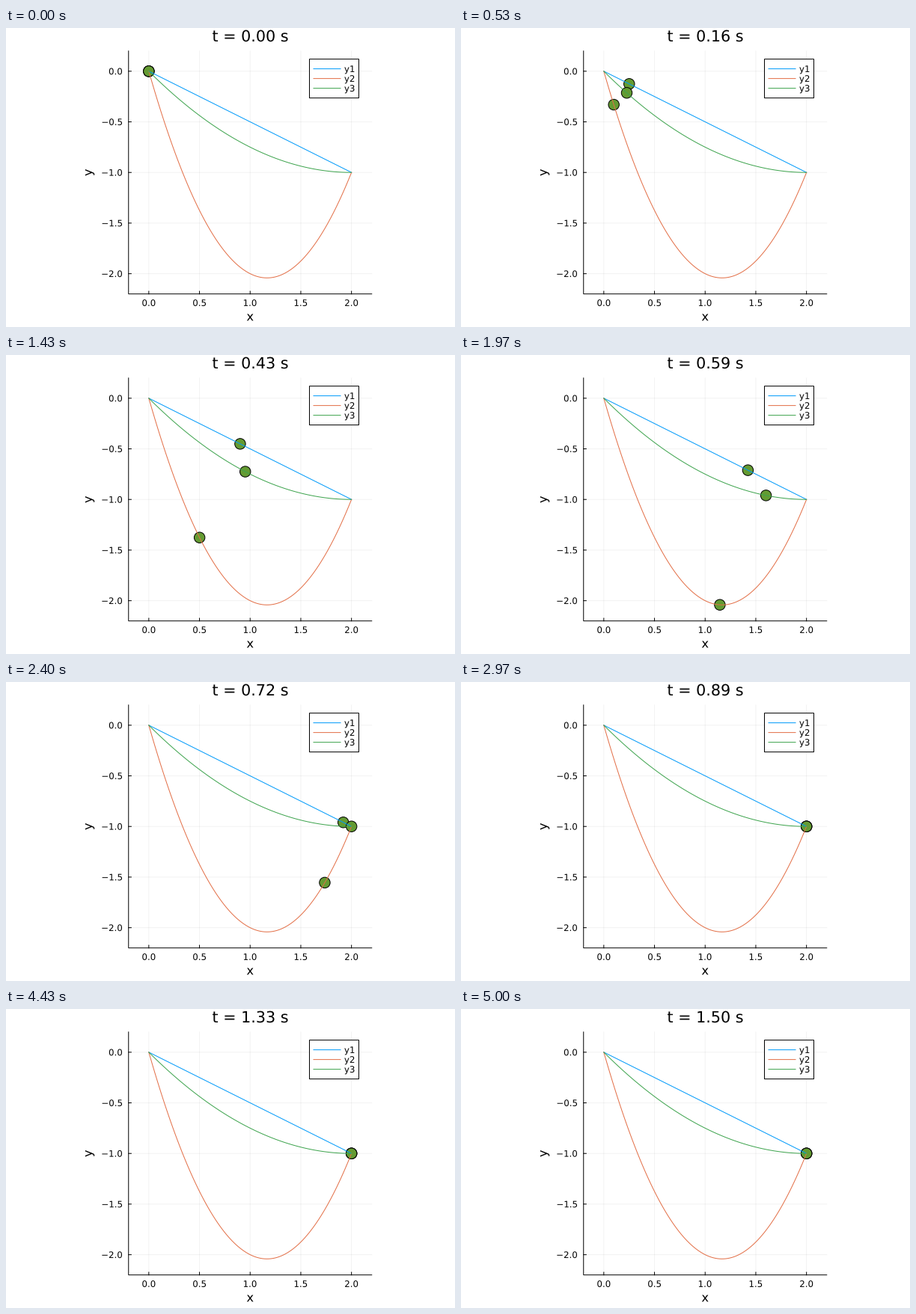
Animation, 600 px wide and 400 px high, one loop 5030 ms. Source, as a matplotlib script:

```python
import numpy as np
import matplotlib.pyplot as plt
from matplotlib.animation import FuncAnimation
from matplotlib.patches import Circle, PathPatch, Rectangle
from matplotlib.textpath import TextPath
from matplotlib.transforms import Affine2D

W, H, DPI = 600, 400, 100
PT = 72 / DPI                 # points per pixel
TICK, LOOP = 10, 5030         # ms
G, HEAD = 9.81, 0.1           # gravity, height the beads fell before the start
LEFT, TOP, SIDE = 163.75, 30.75, 325.0
UNIT = SIDE / 2.4
BEAD = "#649b32"

# y = a x^2 + b x, label, colour
TRACKS = [
    (0.0, -0.5, "y1", "#009afa"),
    (1.5, -3.5, "y2", "#e36f47"),
    (0.25, -1.0, "y3", "#3ea44e"),
]

plt.rcParams["font.family"] = "DejaVu Sans"
fig = plt.figure(figsize=(W / DPI, H / DPI), dpi=DPI, facecolor="white")
ax = fig.add_axes([0, 0, 1, 1])
ax.set(xlim=(0, W), ylim=(H, 0))
ax.axis("off")


def to_px(x, y):
    return LEFT + (x + 0.2) * UNIT, TOP + (0.2 - y) * UNIT


def stroke(xs, ys, color="black", **kw):
    ax.plot(xs, ys, color=color, lw=PT, snap=False, **kw)


def text_path(x, y, s, size, align=0.5, angle=0):
    """Outline of s with its baseline through (x, y), in pixels."""
    path = TextPath((0, 0), s, size=size)
    box = path.get_extents()
    place = Affine2D().translate(-box.x0 - align * box.width, 0)
    place.scale(1, -1).rotate_deg(-angle).translate(x, y)
    return place.transform_path(path)


def text(*args, **kw):
    patch = PathPatch(text_path(*args, **kw), fc="black", lw=0, snap=False)
    return ax.add_patch(patch)


def title_path(t):
    return text_path(326.3, 18, f"t = {t:.2f} s", 20.7)


def slide(a, b, x):
    """Time at which a frictionless bead reaches each x."""
    y, slope = a * x**2 + b * x, 2 * a * x + b
    pace = np.sqrt((1 + slope**2) / (2 * G * (HEAD - y)))
    steps = (pace[1:] + pace[:-1]) / 2 * np.diff(x)
    return np.concatenate([[0], np.cumsum(steps)])


# Grid, ticks and axes
right, bottom = LEFT + SIDE, TOP + SIDE
for v in np.arange(5) / 2:
    px, py = to_px(v, -v)
    stroke([px, px], [TOP, bottom], alpha=0.05, zorder=1)
    stroke([LEFT, right], [py, py], alpha=0.05, zorder=1)
    stroke([px, px], [bottom, bottom - 3.6])
    stroke([LEFT, LEFT + 3.6], [py, py])
    text(px, 371.9, f"{v:.1f}", 11.8)
    text(155, py + 4.4, f"{-v or 0:.1f}".replace("-", "−"), 11.8, align=1)
stroke([LEFT, LEFT, right], [TOP, bottom, bottom])
text(326.2, 391.5, "x", 16.3)
text(114.8, 193.3, "y", 16.3, angle=90)
title = ax.add_patch(PathPatch(title_path(0), fc="black", lw=0, snap=False))

# Legend, curves and beads
ax.add_patch(Rectangle((405.5, 41.6), 66, 52, fc="white", ec="black",
                       lw=PT, snap=False))
xs = np.linspace(0, 2, 2001)
beads = []
for i, (a, b, name, color) in enumerate(TRACKS):
    row = 54.6 + 13 * i
    stroke([411, 447], [row, row], color)
    text(452.3, row + 4.3, name, 11.8, align=0)

    stroke(*to_px(xs[::20], a * xs[::20]**2 + b * xs[::20]), color, zorder=4)
    dot = ax.add_patch(Circle(to_px(0, 0), 7.2, fc=BEAD, ec="black", lw=PT, zorder=3))
    beads.append((dot, a, b, slide(a, b, xs)))


def update(i):
    # 30 poses per second, each starting on the nearest 10 ms tick
    t = (3 * i + 1) // 10 / 100
    title.set_path(title_path(t))
    for dot, a, b, times in beads:
        x = np.interp(t, times, xs)
        dot.center = to_px(x, a * x**2 + b * x)
    return [title] + [bead[0] for bead in beads]


anim = FuncAnimation(fig, update, frames=LOOP // TICK, interval=TICK, repeat=True)
plt.show()
```
